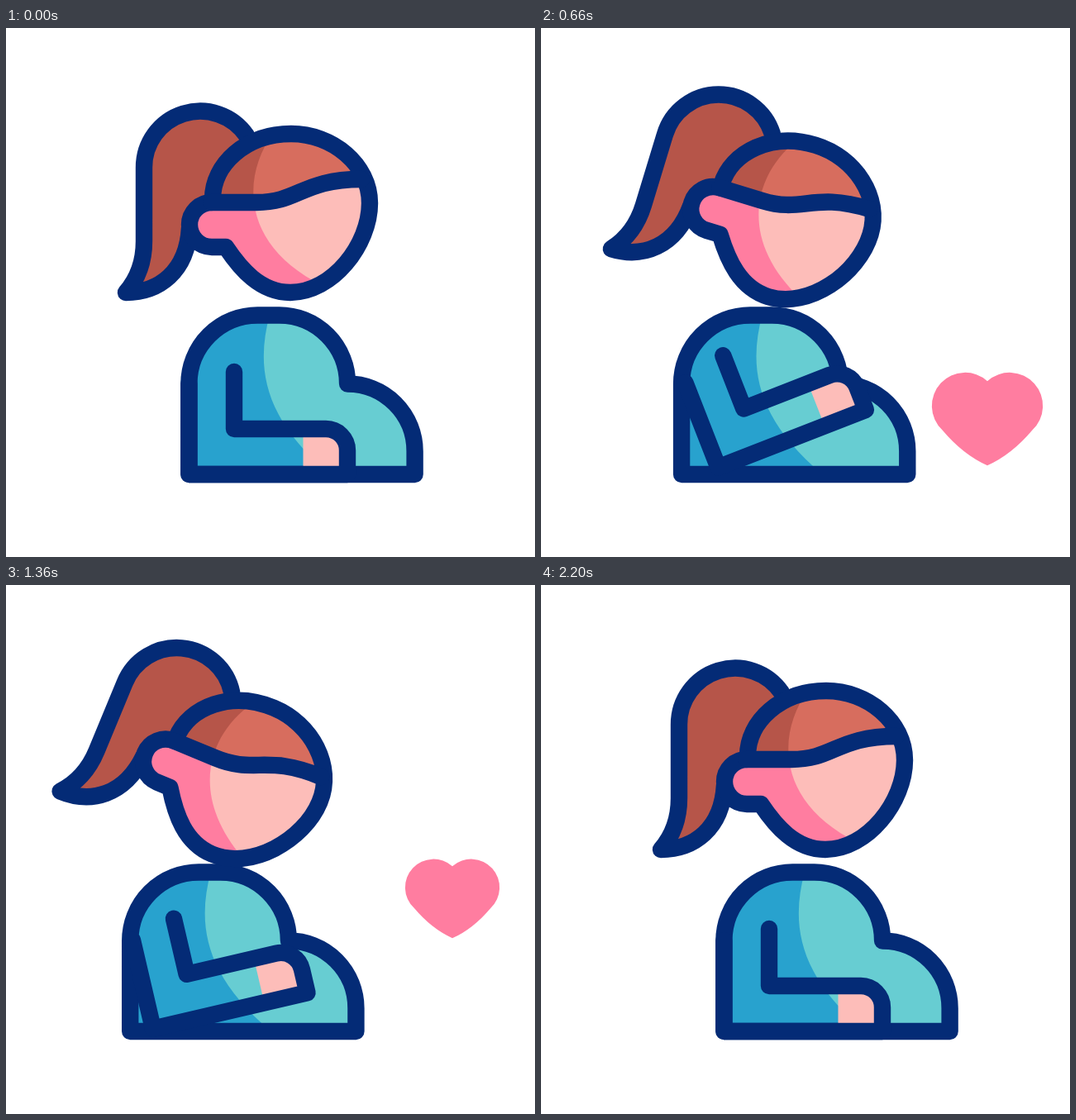
These frames come from a looping animation (640x640 px, 2.4 s). An HTML page with a canvas:

```html
<!DOCTYPE html>
<html lang="en">
<head>
<meta charset="utf-8">
<title>Expecting</title>
<style>
  html, body { margin: 0; width: 100%; height: 100%; overflow: hidden; background: #fff; }
  canvas { display: block; width: 100vw; height: 100vh; object-fit: contain; }
</style>
</head>
<body>
<canvas id="stage" width="640" height="640"></canvas>
<script>
const ctx = document.getElementById('stage').getContext('2d');
const LOOP = 2400, STEP = 20;
const NAVY = '#042b76', BLUE = '#28a2ce', TEAL = '#67cdd2', PINK = '#ff7da0',
      SKIN = '#fdbdb9', HAIR = '#b65549', HAIR_LIGHT = '#d76d5e';

const body = new Path2D('M221.4 540V430.5A83 83 0 0 1 304.4 347.5H330.6A82.5 83 0 0 1 413.1 430.5A81.5 81.5 0 0 1 494.6 512V540Z');
const bodyLight = new Path2D('M319 347C302 410 311 472 392 540H520V330H319Z');
const sleeve = new Path2D('M221.4 430V540H413V511A26 26 0 0 0 387 485H276V416');
const hand = new Path2D('M359.5 485H387A26 26 0 0 1 413 511V540H359.5Z');

const ponytail = new Path2D('M291 130A68 68 0 0 0 167 169V258C167 285 158 305 145 320C185 320 219 295 222 242');
const ponytailFill = new Path2D('M291 130A68 68 0 0 0 167 169V258C167 285 158 305 145 320C185 320 219 295 222 242L260 215Z');
const skull = 'M250 207C250 165 290 128 345 128C395 128 440 165 440 212C440 262 395 320 344 320C308 320 284 292 266 265H249A27 27 0 0 1 249 211';
const head = new Path2D(skull);
const fringe = 'H303C355 211 358 183 430 183';
const band = new Path2D('M249 211' + fringe);
const hair = new Path2D('M240 211' + fringe + 'H450V110H240Z');
const headLight = new Path2D('M325 125C286 175 281 262 384 312L400 340H460V110H325Z');

const heart = new Path2D();
heart.arc(-0.4, -0.2375, 0.6, 2.324, 2 * Math.PI - 0.841);
heart.arc(0.4, -0.2375, 0.6, Math.PI + 0.841, 2 * Math.PI + 0.818);
heart.quadraticCurveTo(0.44, 0.64, 0, 0.8375);
heart.quadraticCurveTo(-0.44, 0.64, -0.81, 0.2);

const clamp = v => Math.min(1, Math.max(0, v));
const smooth = u => u * u * (3 - 2 * u);

// Symmetric cubic-bezier(a, 0, 1 - a, 1)
function ease(u, a) {
  let lo = 0, hi = 1;
  u = clamp(u);
  for (let i = 0; i < 30; i++) {
    const s = (lo + hi) / 2, r = 1 - s;
    const x = 3 * r * r * s * a + 3 * r * s * s * (1 - a) + s * s * s;
    if (x < u) lo = s; else hi = s;
  }
  return smooth((lo + hi) / 2);
}

// Smoothly interpolates [time, value] keys
function track(keys, t) {
  if (t <= keys[0][0]) return keys[0][1];
  for (let i = 1; i < keys.length; i++) {
    const [t0, v0] = keys[i - 1], [t1, v1] = keys[i];
    if (t < t1) return v0 + (v1 - v0) * smooth((t - t0) / (t1 - t0));
  }
  return keys[keys.length - 1][1];
}

const ARM = [[0, 0], [715, -21.7], [1145, -8.9], [1685, -21], [2200, 0]];
const BEAT = [[308, 0], [542, 75.5], [835, 52], [1145, 84.5], [1432, 52], [1715, 84.5], [2000, 0]];

const lean = t => ease((t - 188) / 792, 0.57) - ease((t - 1207) / 917, 0.8);

function fill(path, color) {
  ctx.fillStyle = color;
  ctx.fill(path);
}

function line(path) {
  ctx.strokeStyle = NAVY;
  ctx.lineWidth = 20.4;
  ctx.lineCap = ctx.lineJoin = 'round';
  ctx.stroke(path);
}

function clipped(path, draw) {
  ctx.save();
  ctx.clip(path);
  draw();
  ctx.restore();
}

function rotated(x, y, degrees, draw) {
  ctx.save();
  ctx.translate(x, y);
  ctx.rotate(degrees * Math.PI / 180);
  ctx.translate(-x, -y);
  draw();
  ctx.restore();
}

function drawBody() {
  fill(body, BLUE);
  clipped(body, () => fill(bodyLight, TEAL));
  line(body);
}

function drawArm() {
  fill(hand, SKIN);
  line(sleeve);
}

function drawHead() {
  fill(ponytailFill, HAIR);
  line(ponytail);
  fill(head, PINK);
  clipped(head, () => {
    fill(headLight, SKIN);
    fill(hair, HAIR);
    clipped(hair, () => fill(headLight, HAIR_LIGHT));
  });
  line(head);
  line(band);
}

function drawHeart(t) {
  const size = track(BEAT, t);
  if (size <= 0) return;
  ctx.save();
  ctx.translate(540, 497 - 200 * smooth(clamp((t - 220) / 2040)));
  ctx.scale(size, size);
  fill(heart, PINK);
  ctx.restore();
}

function render(t) {
  ctx.fillStyle = '#fff';
  ctx.fillRect(0, 0, 640, 640);
  drawHeart(t);
  ctx.save();
  ctx.translate(-72.5 * lean(t), 0);
  drawBody();
  rotated(221.3, 418, track(ARM, t), drawArm);
  rotated(318, 264, 23 * lean(t + 12), drawHead);
  ctx.restore();
}

const start = performance.now();
function tick() {
  const t = (performance.now() - start) % LOOP;
  render(Math.floor(t / STEP) * STEP);
  requestAnimationFrame(tick);
}
tick();
</script>
</body>
</html>
```
